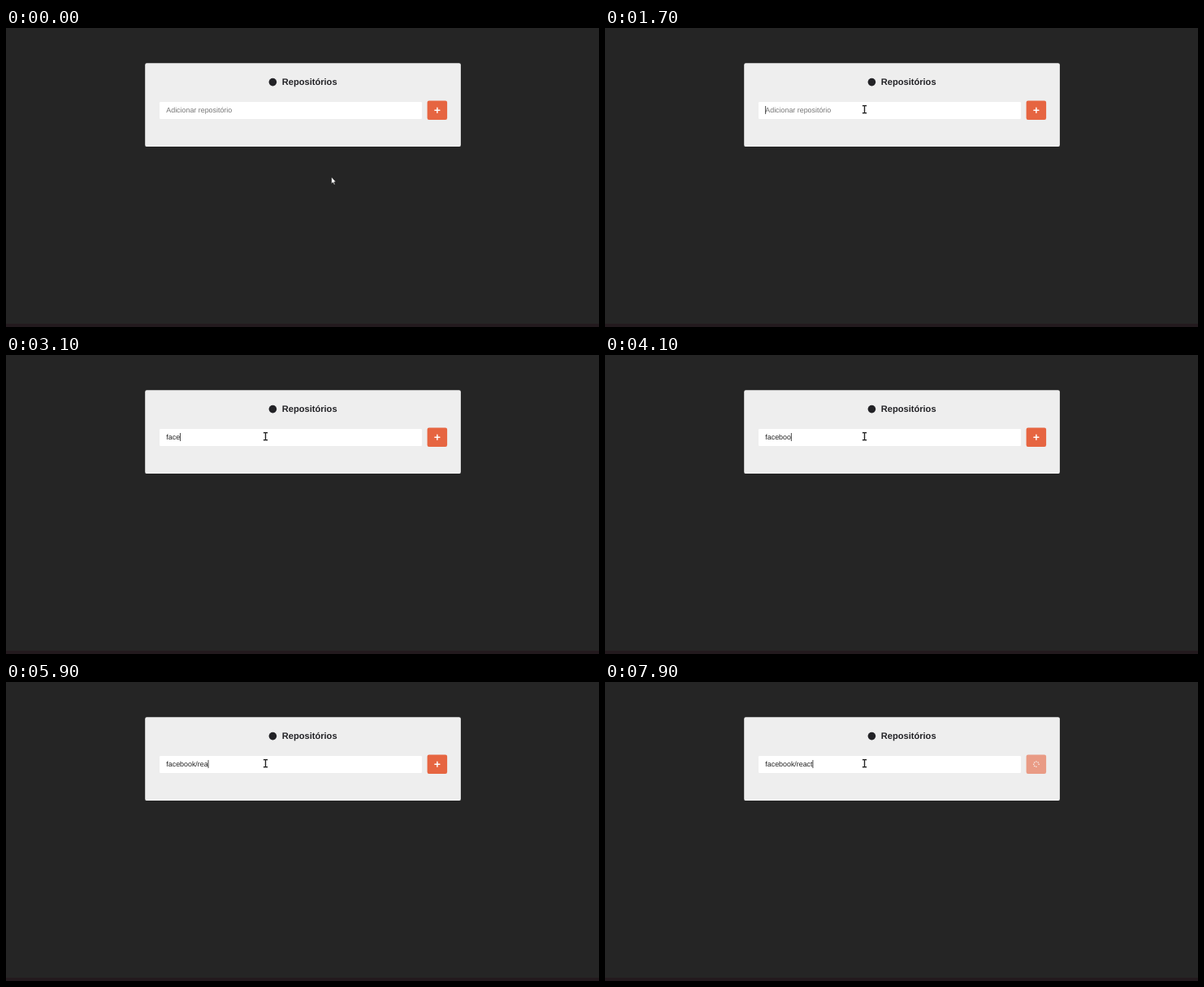
Animation, 730 px wide and 368 px high, one loop 8000 ms. Source, as an HTML page:

```html
<!DOCTYPE html>
<html lang="pt">
<head>
<meta charset="utf-8">
<style>
  html, body { margin: 0; width: 100%; height: 100%; overflow: hidden; background: #252525; }
  svg { display: block; }
  text { font-family: "Liberation Sans", Arial, sans-serif; text-rendering: geometricPrecision; white-space: pre; }
</style>
</head>
<body>
<svg width="730" height="368" viewBox="0 0 730 368">
  <rect width="730" height="368" fill="#252525"/>
  <rect y="364" width="730" height="4" fill="#231a1e"/>
  <rect x="171.2" y="43.2" width="388.7" height="102.9" rx="2.2" fill="#eee"/>
  <circle cx="328.4" cy="66.6" r="4.8" fill="#222226"/>
  <text x="339.7" y="70" font-size="11.11" font-weight="700" fill="#222226">Repositórios</text>

  <rect x="189" y="91" width="323" height="21" rx="1.2" fill="#fff"/>
  <text id="field" x="197.3" y="104" font-size="8.89"></text>
  <rect id="caret" y="96" width=".8" height="10" fill="#222"/>

  <g id="button">
    <rect x="518.6" y="89.6" width="24.5" height="23.3" rx="2.2" fill="#e66541"/>
    <path id="plus" d="M527.9 101.2h6M530.9 98.2v6" stroke="#fff" stroke-width="1.45" stroke-linecap="round"/>
    <g id="spinner" fill="#fff"></g>
  </g>

  <path id="arrow" d="M0 0V8.6L2 6.9L3.3 9.9L4.6 9.3L3.3 6.4H5.7Z" fill="#fff" stroke="#111" stroke-width=".6"/>
  <g id="beam" fill="none" stroke-linecap="square">
    <path d="M-1.9 -4.5H1.9M0 -4.5V4.5M-1.9 4.5H1.9" stroke="#ddd" stroke-width="2.2"/>
    <path d="M-1.9 -4.5H1.9M0 -4.5V4.5M-1.9 4.5H1.9" stroke="#222" stroke-width="1.2"/>
  </g>
</svg>
<script>
const LOOP = 8000, STEP = 100, FOCUS = 1700, SUBMIT = 7400, BLINK = 600;
const TYPED = 'facebook/react';
const KEYS = [2600, 2700, 3000, 3100, 3800, 3900, 4100, 4900, 5300, 5600, 5700, 5900, 6200, 6500];

const $ = id => document.getElementById(id);
const show = (id, on) => $(id).setAttribute('visibility', on ? 'visible' : 'hidden');
const place = (id, x, y) => $(id).setAttribute('transform', `translate(${x} ${y})`);

// Seven dots on a ring, with a gap at the upper right
for (let i = 0; i < 7; i++) {
  const a = i * Math.PI / 4;
  $('spinner').innerHTML += `<circle cx="${3.15 * Math.cos(a)}" cy="${3.15 * Math.sin(a)}" r=".75"/>`;
}

function drawPointer(t) {
  const p = Math.min(1, Math.max(0, (t - 800) / 500));
  const k = p * p * (3 - 2 * p);
  const x = 400.6 - 81.1 * k, y = 183.2 - 83.1 * k;
  const overField = y < 112;
  place('arrow', x, y);
  place('beam', x, y);
  show('arrow', !overField);
  show('beam', overField);
}

function drawField(t) {
  const field = $('field');
  const count = KEYS.filter(k => k <= t).length;
  field.textContent = count ? TYPED.slice(0, count) : 'Adicionar repositório';
  field.setAttribute('fill', count ? '#222' : '#757575');
  const lastInput = count ? KEYS[count - 1] : FOCUS;
  const width = count ? field.getComputedTextLength() : 0;
  $('caret').setAttribute('x', 197.3 + width);
  show('caret', t >= FOCUS && Math.floor((t - lastInput) / BLINK) % 2 === 0);
}

function drawButton(t) {
  const loading = t >= SUBMIT;
  $('button').setAttribute('opacity', loading ? .6 : 1);
  show('plus', !loading);
  show('spinner', loading);
  $('spinner').setAttribute('transform', `translate(530.9 101.2) rotate(${(t - SUBMIT) * .18})`);
}

function frame() {
  const t = Math.floor(performance.now() % LOOP / STEP) * STEP;
  drawPointer(t);
  drawField(t);
  drawButton(t);
  requestAnimationFrame(frame);
}
frame();
</script>
</body>
</html>
```
